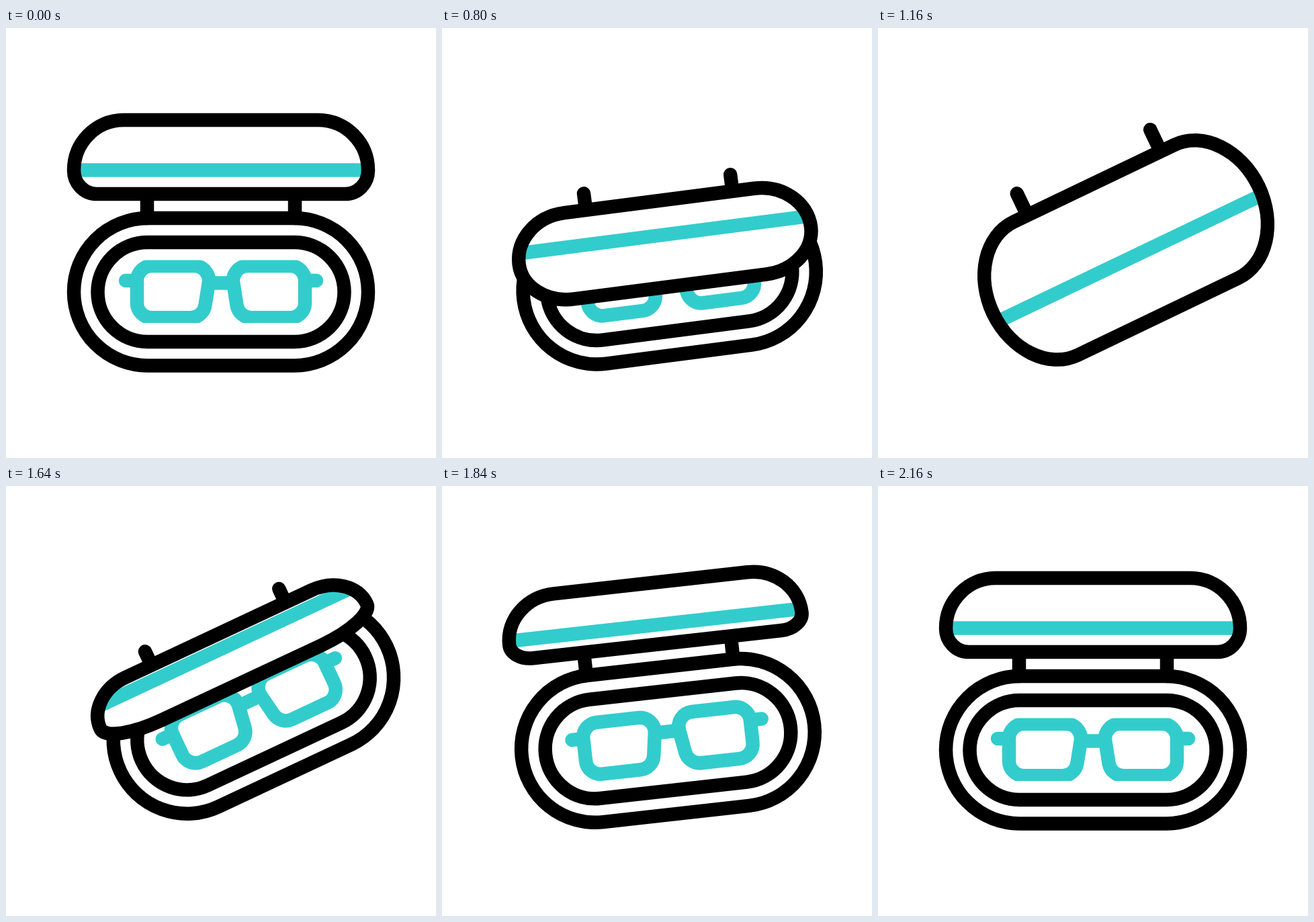
Animation, 640 px wide and 640 px high, one loop 3 s. Source, as an HTML page with a canvas:

```html
<!DOCTYPE html>
<html lang="en">
<head>
<meta charset="utf-8">
<title>Glasses case</title>
<style>
  html, body { margin: 0; width: 100%; height: 100%; overflow: hidden; background: #fff; }
  canvas { display: block; }
</style>
</head>
<body>
<canvas id="stage" width="640" height="640"></canvas>
<script>
const ctx = document.getElementById('stage').getContext('2d');
const LOOP = 3000, STEP = 40, TILT = 25.6;
const TEAL = '#33cccc';

// Lid poses: swing angle, free edge y, stripe y, widest y, hinge edge y,
// then where the free and the hinge edge start to curve (x)
const POSES = [
  [0, 137, 211.5, 212, 247, 175, 135],
  [4, 134, 211.5, 212, 247, 175, 135],
  [12, 131, 213, 215, 247.5, 175, 134],
  [27, 156.5, 219.5, 225, 248.5, 175, 134],
  [97, 350, 291.5, 323, 269.5, 188, 167],
  [118, 403, 324.5, 340, 272, 175, 178],
  [180, 503, 406.5, 393, 283, 188, 188]
];

const capsule = (x, y, w, h) => {
  const path = new Path2D();
  path.roundRect(x, y, w, h, h / 2);
  return path;
};
const outer = capsule(101, 283, 438, 219.5);
const inner = capsule(136.5, 319, 367, 148);
const posts = new Path2D('M210 247V283M430 247V283');
const lens = new Path2D('M195 376a22 22 0 0 1 22-22H280a22 22 0 0 1 21.7 25.6L296.4 412.8' +
  'a22 22 0 0 1-21.7 18.5H217a22 22 0 0 1-22-22ZM178 376H195');
const bridge = new Path2D('M302 379.5H338');

const smooth = (t, start, length) => {
  const p = Math.min(1, Math.max(0, (t - start) / length));
  return p * p * (3 - 2 * p);
};

function swingAt(t) {
  if (t < 1640) return 180 * smooth(t, 520, 465);
  return 97 * Math.max(0, 1 - (t - 1640) / 520) ** 2.63;
}

function tiltAt(t) {
  return TILT * (t < 1640 ? smooth(t, 603, 557) : 1 - smooth(t, 1612, 338));
}

function poseAt(swing) {
  const i = Math.max(1, POSES.findIndex(pose => pose[0] >= swing));
  const a = POSES[i - 1], b = POSES[i];
  const p = (swing - a[0]) / (b[0] - a[0]);
  return a.map((v, n) => v + (b[n] - v) * p);
}

function lidPath(free, wide, hinge, freeX, hingeX) {
  const path = new Path2D(), k = 0.5523;
  const toSide = (side, x, y) => path.bezierCurveTo(
    x + k * (side - x), y, side, wide + k * (y - wide), side, wide);
  const fromSide = (side, x, y) => path.bezierCurveTo(
    side, wide + k * (y - wide), x + k * (side - x), y, x, y);
  path.moveTo(freeX, free);
  path.lineTo(640 - freeX, free);
  toSide(539, 640 - freeX, free);
  fromSide(539, 640 - hingeX, hinge);
  path.lineTo(hingeX, hinge);
  toSide(101, hingeX, hinge);
  fromSide(101, freeX, free);
  path.closePath();
  return path;
}

function drawGlasses(trimmed) {
  ctx.save();
  if (trimmed) {
    ctx.beginPath();
    ctx.rect(160, 345.5, 320, 93.5);
    ctx.clip();
  }
  ctx.strokeStyle = TEAL;
  ctx.stroke(bridge);
  ctx.stroke(lens);
  ctx.translate(640, 0);
  ctx.scale(-1, 1);
  ctx.stroke(lens);
  ctx.restore();
}

function drawLid(swing) {
  const [, free, stripe, wide, hinge, freeX, hingeX] = poseAt(swing);
  const lid = lidPath(free, wide, hinge, freeX, hingeX);
  ctx.fillStyle = '#fff';
  ctx.fill(lid);
  ctx.save();
  ctx.clip(lid);
  ctx.fillStyle = TEAL;
  ctx.fillRect(90, stripe - 10.25, 460, 20.5);
  ctx.restore();
  ctx.stroke(lid);
}

function draw(t) {
  const tilt = tiltAt(t);
  ctx.fillStyle = '#fff';
  ctx.fillRect(0, 0, 640, 640);
  ctx.save();
  // The case turns about its left hinge, which drifts slightly
  ctx.translate(210 + 0.236 * tilt - 0.0142 * tilt * tilt, 247 - 0.7 * Math.min(1, tilt / 6));
  ctx.rotate(-tilt * Math.PI / 180);
  ctx.translate(-210, -247);
  ctx.lineWidth = 20.5;
  ctx.lineCap = ctx.lineJoin = 'round';
  ctx.strokeStyle = '#000';
  for (const path of [outer, inner, posts]) ctx.stroke(path);
  drawGlasses(tilt === 0);
  drawLid(swingAt(t));
  ctx.restore();
}

const start = performance.now();
function tick() {
  const t = (performance.now() - start) % LOOP;
  draw(Math.floor(t / STEP) * STEP);
  requestAnimationFrame(tick);
}
tick();
</script>
</body>
</html>
```
